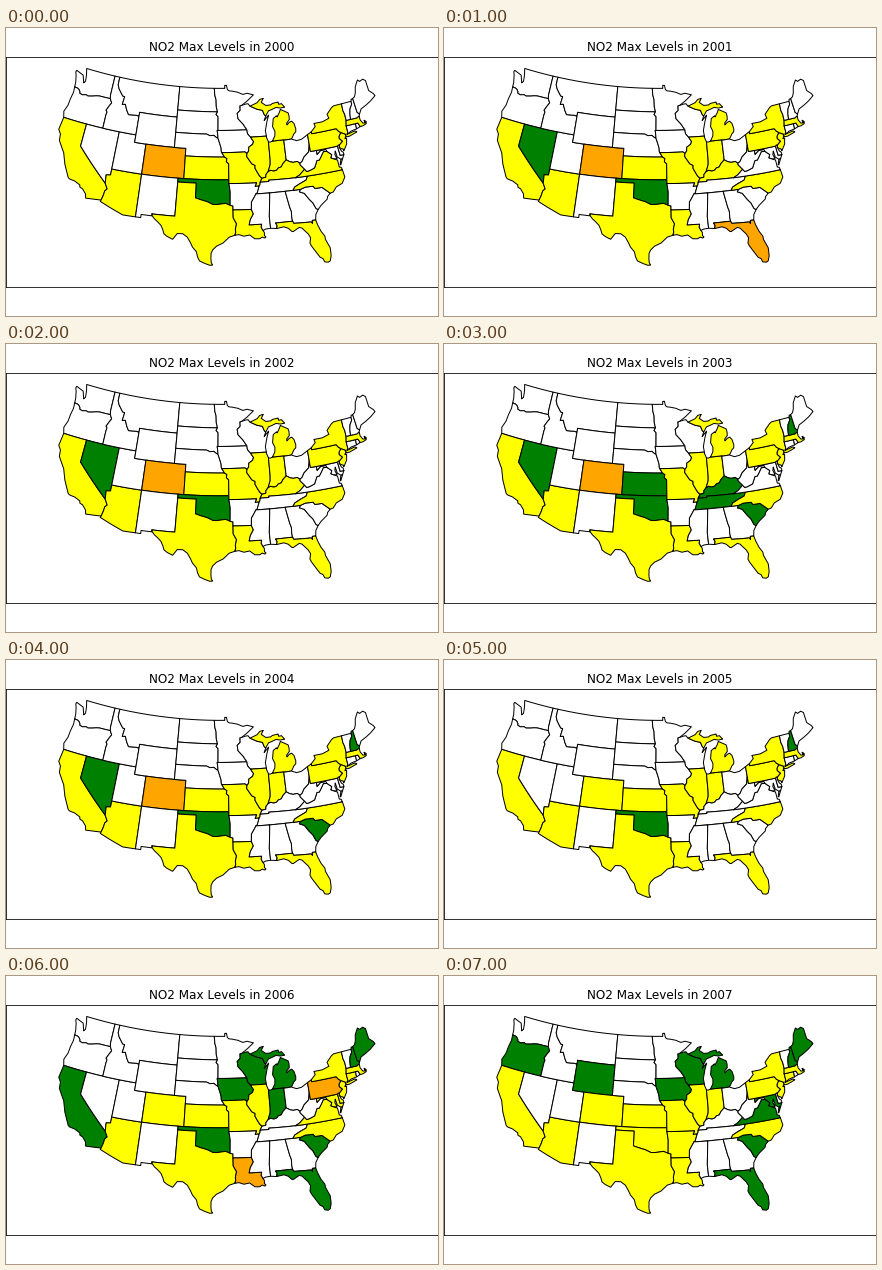
Write a matplotlib script that moves like this. It is 432 by 288 pixels and loops after 8 s.

```python
import numpy as np
import matplotlib.pyplot as plt
from matplotlib.animation import FuncAnimation
from matplotlib.patches import PathPatch
from matplotlib.path import Path

# Lambert conformal conic, standard parallels 33N and 45N, centred on 96W
LAT1, LAT2 = np.radians([33, 45])


def half_tan(lat):
    return np.tan(np.pi / 4 + lat / 2)


CONE = np.log(np.cos(LAT1) / np.cos(LAT2)) / np.log(half_tan(LAT2) / half_tan(LAT1))
SCALE = np.cos(LAT1) * half_tan(LAT1) ** CONE / CONE


def project(west, north):
    rho = SCALE / half_tan(np.radians(north)) ** CONE
    theta = CONE * np.radians(96 - west)
    return np.column_stack([rho * np.sin(theta), -rho * np.cos(theta)])


def line(*v):
    """Pairs of degrees west, degrees north."""
    return list(zip(v[::2], v[1::2]))


def ring(points, steps=6):
    """Closed projected path; long parallels bend, so each edge is subdivided."""
    p = np.array(points + points[:1], float)
    t = np.arange(steps)[:, None] / steps
    fine = np.vstack([a + (b - a) * t for a, b in zip(p, p[1:])] + [p[-1:]])
    codes = [Path.MOVETO] + [Path.LINETO] * (len(fine) - 2) + [Path.CLOSEPOLY]
    return Path(project(*fine.T), codes)


states = {}


def state(code, *rings):
    states[code] = Path.make_compound_path(*map(ring, rings))


# Shared borders, west
columbia = line(124.0, 46.25, 123.4, 46.2, 123.1, 46.1, 122.8, 45.85, 122.75, 45.65,
                122.2, 45.55, 121.5, 45.7, 121.1, 45.6, 120.3, 45.75, 119.6, 45.92,
                119.0, 46, 116.92, 46)
snake = line(116.92, 46, 116.5, 45.5, 116.85, 45, 117.2, 44.4, 116.95, 44.2,
             117.03, 43.8, 117.03, 42)
bitterroot = line(116.05, 48, 115.7, 47.5, 114.75, 46.7, 114.35, 46.65, 114.5, 45.6,
                  113.95, 45.7, 113.45, 44.95, 113.0, 44.45, 111.5, 44.55, 111.05, 44.47)
colorado = line(114.63, 35, 114.13, 34.3, 114.45, 34, 114.53, 33.4, 114.72, 32.72)
mead = line(114.75, 36.1, 114.05, 36.2, 114.05, 37)

# Shared borders, plains
red_north = line(97.23, 49, 97.1, 48.1, 96.85, 47.5, 96.8, 46.6, 96.56, 45.94)
sd_mn = line(96.56, 45.94, 96.83, 45.6, 96.45, 45.3, 96.45, 43.5)
sioux = line(96.45, 43.5, 96.6, 43.5, 96.5, 43, 96.45, 42.49)
niobrara = line(104.05, 43, 98.5, 43, 97.9, 42.8, 97.2, 42.85, 96.7, 42.55, 96.45, 42.49)
ne_ia = line(96.45, 42.49, 96.1, 41.7, 95.9, 41.2, 95.85, 40.7, 95.77, 40.58)
ne_mo = line(95.77, 40.58, 95.3, 40)
ks_mo = line(95.3, 40, 94.9, 39.8, 95.0, 39.4, 94.61, 39.1, 94.62, 37)
red_south = line(94.48, 33.64, 95.2, 33.9, 96.5, 33.75, 97.2, 33.75, 98.1, 34.1,
                 99.2, 34.35, 100, 34.56)
sabine = line(94.04, 33.02, 94.04, 32, 93.55, 31.2, 93.75, 30.5, 93.7, 30.1, 93.85, 29.71)

# Shared borders, Mississippi and Great Lakes
st_croix = line(92.01, 46.71, 92.29, 46.66, 92.29, 46.08, 92.87, 45.7, 92.75, 45,
                91.9, 44.3, 91.22, 43.5)
miss_wi = line(91.22, 43.5, 91.15, 43, 90.64, 42.51)
miss_il = line(90.64, 42.51, 90.15, 41.9, 90.35, 41.55, 91.05, 41.2, 91.1, 40.7, 91.42, 40.38)
miss_mo = line(91.42, 40.38, 91.5, 40, 90.7, 39, 90.15, 38.75, 90.2, 38.4, 89.9, 37.9,
               89.5, 37.3, 89.15, 37)
miss_ky = line(89.15, 37, 89.5, 36.5)
miss_boot = line(89.5, 36.5, 89.55, 36.2, 89.7, 36)
bootheel = line(89.7, 36, 90.37, 36, 90.1, 36.45, 94.62, 36.5)
miss_tn = line(89.7, 36, 90.1, 35.1, 90.31, 35)
miss_ms = line(90.31, 35, 90.6, 34.6, 91.1, 33.95, 91.17, 33)
miss_la = line(91.17, 33, 90.9, 32.4, 91.4, 31.7, 91.63, 31, 89.73, 31, 89.83, 30.6,
               89.59, 30.16)
wi_mi = line(87.6, 45.1, 87.85, 45.35, 88.1, 45.9, 89.1, 46.1, 90.4, 46.57)
wabash = line(87.53, 41.71, 87.53, 39.35, 87.6, 38.7, 88.05, 37.8)

# Shared borders, south and Ohio valley
tombigbee = line(88.2, 35, 88.1, 34.9, 88.47, 31.9, 88.42, 30.38)
al_fl = line(87.53, 30.27, 87.4, 30.65, 87.6, 31, 85, 31)
chatta = line(85.6, 35, 85.18, 32.87, 85.0, 32.3, 85.05, 31.5, 85, 31)
ga_fl = line(85, 31, 84.86, 30.7, 82.2, 30.57, 82.05, 30.36, 82.0, 30.75, 81.49, 30.73)
savannah = line(83.11, 35, 83.35, 34.7, 82.6, 34.4, 81.95, 33.5, 81.5, 33, 81.15, 32.2,
                80.86, 32.03)
nc_sc = line(83.11, 35, 82.3, 35.2, 81.04, 35.15, 80.8, 34.82, 79.67, 34.8, 78.55, 33.86)
smoky = line(84.32, 35, 84.0, 35.4, 83.1, 35.75, 82.0, 36.1, 81.68, 36.59)
ky_tn = line(89.5, 36.5, 88.07, 36.5, 88.07, 36.68, 83.68, 36.6)
cumberland = line(83.68, 36.6, 82.9, 36.9, 81.97, 37.54)
big_sandy = line(82.6, 38.4, 82.6, 38.2, 81.97, 37.54)
ohio_il = line(89.15, 37, 88.5, 37.1, 88.45, 37.45, 88.05, 37.8)
ohio_in = line(88.05, 37.8, 87.6, 37.95, 87.1, 37.8, 86.6, 37.9, 86.3, 38.15, 85.8, 38.25,
               85.4, 38.7, 84.82, 39.1)
ohio_oh = line(84.82, 39.1, 84.25, 38.8, 83.7, 38.65, 83.0, 38.7, 82.6, 38.4)
ohio_wv = line(82.6, 38.4, 82.2, 38.6, 81.75, 39.15, 80.85, 39.7, 80.6, 40.4, 80.52, 40.64)

# Shared borders, Atlantic side
va_wv = line(81.97, 37.54, 81.68, 37.2, 81.2, 37.25, 80.3, 37.5, 79.7, 38.4, 79.3, 38.4,
             78.9, 38.8, 78.35, 39.4, 77.72, 39.32)
md_wv = line(79.48, 39.72, 79.48, 39.2, 78.8, 39.6, 78.4, 39.62, 77.85, 39.6, 77.72, 39.32)
potomac = line(77.72, 39.32, 77.45, 39.1, 77.04, 38.8, 77.3, 38.4, 76.99, 38.24)
de_md = line(75.79, 39.72, 75.7, 38.46, 75.05, 38.45)
delaware_n = line(75.35, 42, 75.05, 41.6, 74.69, 41.36)
delaware_s = line(74.69, 41.36, 75.12, 40.95, 75.2, 40.65, 74.75, 40.2, 75.42, 39.8)
ny_ct = line(73.71, 40.93, 73.5, 41.2, 73.5, 42.05)
champlain = line(73.27, 42.75, 73.25, 43.55, 73.4, 44.1, 73.35, 45.01)
connecticut = line(71.5, 45.01, 71.55, 44.6, 72.05, 44.1, 72.3, 43.5, 72.46, 42.73)
me_nh = line(70.65, 43.09, 70.98, 43.4, 71.08, 45.3)

# West
state("WA", line(122.84, 49, 122.5, 48.18, 122.34, 47.36, 122.59, 47.1, 123.12, 48.04,
                 124.57, 48.38, 124.69, 48.18, 124.4, 47.72, 124.08, 46.86)
      + columbia + line(117.04, 46.43, 117.03, 49))
state("OR", columbia[::-1] + line(123.9, 45.52, 124.08, 44.62, 124.14, 43.71,
                                  124.53, 42.77, 124.21, 42) + snake[::-1])
state("CA", line(120, 42, 124.21, 42, 124.4, 40.31, 123.87, 39.77, 123.73, 38.95,
                 122.95, 38.11, 122.42, 37.55, 121.71, 36.16, 120.62, 34.61, 120.37, 34.45,
                 119.44, 34.35, 118.52, 34.03, 118.41, 33.74, 117.94, 33.62, 117.3, 33.05,
                 117.13, 32.53) + colorado[::-1] + line(120, 39))
state("NV", line(120, 42, 120, 39, 114.63, 35) + mead + line(114.04, 42))
state("AZ", line(109.05, 37) + mead[::-1] + colorado
      + line(114.81, 32.53, 113.3, 32.04, 111.02, 31.33, 109.05, 31.34))
state("UT", line(114.04, 42, 111.05, 42, 111.05, 41, 109.05, 41, 109.05, 37, 114.05, 37))
state("ID", snake[::-1] + line(117.04, 46.43, 117.03, 49, 116.05, 49) + bitterroot
      + line(111.05, 42))
state("MT", line(116.05, 49) + bitterroot + line(111.05, 45, 104.05, 45, 104.05, 49))
state("WY", line(111.05, 41, 111.05, 45, 104.05, 45, 104.05, 41))
state("CO", line(109.05, 37, 109.05, 41, 102.05, 41, 102.05, 37))
state("NM", line(109.05, 37, 103, 37, 103.05, 32, 106.62, 32, 106.51, 31.75,
                 108.24, 31.75, 108.24, 31.34, 109.05, 31.34))

# Plains
state("ND", line(104.05, 45.94, 104.05, 49) + red_north)
state("SD", line(104.05, 45.94) + sd_mn + sioux + niobrara[::-1])
state("NE", niobrara + ne_ia + ne_mo + line(102.05, 40, 102.05, 41, 104.05, 41))
state("KS", line(102.05, 37, 102.05, 40) + ks_mo)
state("OK", line(103, 37, 94.62, 37, 94.62, 36.5, 94.43, 35.4) + red_south
      + line(100, 36.5, 103, 36.5))
state("TX", line(103, 36.5, 100, 36.5) + red_south[::-1] + line(94.04, 33.55) + sabine
      + line(94.69, 29.48, 95.6, 28.74, 96.59, 28.31, 97.14, 27.83, 97.37, 27.38,
             97.38, 26.69, 97.33, 26.21, 97.14, 25.87, 97.53, 25.84, 98.24, 26.06,
             99.02, 26.37, 99.3, 26.84, 99.52, 27.54, 100.11, 28.11, 100.46, 28.7,
             100.96, 29.38, 101.66, 29.78, 102.48, 29.76, 103.11, 28.97, 103.94, 29.27,
             104.46, 29.57, 104.71, 30.12, 105.04, 30.64, 105.63, 31.08, 106.14, 31.4,
             106.51, 31.75, 106.62, 32, 103.05, 32))
state("MN", red_north + sd_mn + st_croix[::-1]
      + line(90.9, 47.25, 89.6, 48.01, 90.83, 48.27, 91.64, 48.14, 92.61, 48.45,
             93.63, 48.61, 94.33, 48.67, 94.64, 48.84, 94.82, 49.39, 95.16, 49.38, 95.16, 49))
state("IA", miss_wi + miss_il + line(91.75, 40.6) + ne_ia[::-1] + sioux[::-1])
state("MO", line(95.77, 40.58, 91.75, 40.6) + miss_mo + miss_ky + miss_boot + bootheel
      + ks_mo[::-1])
state("AR", bootheel[::-1] + miss_tn + miss_ms
      + line(94.04, 33.02, 94.04, 33.55, 94.48, 33.64, 94.43, 35.4))
state("LA", miss_la + line(89.41, 29.89, 89.43, 29.49, 89.22, 29.29, 89.41, 29.16,
                           89.78, 29.31, 90.15, 29.12, 90.88, 29.15, 91.63, 29.68,
                           92.5, 29.55, 93.23, 29.78) + sabine[::-1])

# Great Lakes
state("WI", st_croix + miss_wi + line(87.8, 42.49, 87.9, 43.2, 87.5, 44.3, 87.05, 45.2,
                                      87.95, 44.55) + wi_mi
      + line(90.75, 46.9, 91.2, 46.87))
state("IL", miss_il + miss_mo + ohio_il + wabash[::-1] + line(87.8, 42.3, 87.8, 42.49))
state("IN", ohio_in + line(84.81, 41.76, 86.82, 41.76, 87.2, 41.65) + wabash)
state("MI",
      wi_mi + line(89.0, 46.95, 88.45, 47.35, 87.75, 47.45, 88.2, 46.95, 87.4, 46.5,
                   86.5, 46.5, 86.1, 46.67, 85.0, 46.77, 84.95, 46.47, 84.4, 46.5,
                   83.9, 46, 84.7, 45.95, 85.5, 46.1, 86.3, 45.9, 87.0, 45.75),
      line(86.82, 41.76, 86.3, 42.4, 86.2, 43, 86.53, 43.65, 86.25, 44.7, 85.6, 45,
           85.5, 44.85, 85.0, 45.4, 84.75, 45.77, 84.1, 45.5, 83.4, 45.2, 83.3, 44.8,
           83.35, 44.3, 83.9, 43.9, 83.9, 43.65, 83.4, 43.95, 82.95, 44.05, 82.6, 43.7,
           82.42, 43, 82.5, 42.6, 82.9, 42.35, 83.15, 42.05, 83.45, 41.73, 84.81, 41.7,
           84.81, 41.76))
state("OH", ohio_oh + ohio_wv + line(80.52, 41.98, 81.7, 41.5, 82.6, 41.42,
                                     83.45, 41.73, 84.81, 41.7))

# South
state("KY", miss_ky[::-1] + ohio_il + ohio_in + ohio_oh + big_sandy + cumberland[::-1]
      + ky_tn[::-1])
state("TN", ky_tn + smoky[::-1] + miss_tn[::-1] + miss_boot[::-1])
state("MS", miss_ms + miss_la + line(89.18, 30.32) + tombigbee[::-1])
state("AL", tombigbee + al_fl + chatta[::-1])
state("GA", chatta + ga_fl + line(81.34, 31.44) + savannah[::-1])
state("FL", al_fl + ga_fl
      + line(81.31, 30.04, 80.98, 29.18, 80.54, 28.47, 80.53, 28.04, 80.06, 26.88,
             80.09, 26.21, 80.13, 25.82, 80.38, 25.21, 80.68, 25.08, 81.17, 25.2,
             81.33, 25.64, 81.71, 25.87, 82.24, 26.73, 82.71, 27.5, 82.86, 27.89,
             82.65, 28.55, 82.93, 29.1, 83.71, 29.94, 84.1, 30.09, 85.11, 29.64,
             85.29, 29.69, 85.77, 30.15, 86.4, 30.4))
state("SC", savannah + line(80.3, 32.51, 79.2, 33.16, 79.06, 33.49) + nc_sc[::-1])
state("NC", nc_sc + line(78.05, 33.93, 77.4, 34.51, 76.36, 34.81, 75.73, 35.55,
                         75.87, 36.55) + smoky[::-1])
state("VA", cumberland + va_wv + potomac
      + line(76.3, 37.92, 76.26, 36.97, 75.97, 36.9, 75.87, 36.55, 81.68, 36.59),
      line(75.38, 38.02, 75.94, 37.22, 76.03, 37.26, 75.72, 37.94))
state("WV", va_wv + md_wv[::-1] + line(80.52, 39.72) + ohio_wv[::-1] + big_sandy)

# Northeast
state("MD", md_wv + potomac + line(76.33, 38.08, 76.54, 38.72, 76.35, 39.15, 76.23, 38.32,
                                   75.72, 37.94, 75.38, 38.02) + de_md[::-1])
state("DE", de_md + line(75.07, 38.78, 75.32, 38.96, 75.53, 39.5, 75.42, 39.8, 75.6, 39.84))
state("PA", line(80.52, 39.72, 80.52, 41.98, 79.76, 42.27, 79.76, 42) + delaware_n
      + delaware_s + line(75.6, 39.84, 75.79, 39.72))
state("NJ", delaware_s + line(75.53, 39.5, 75.2, 39.25, 74.98, 39.2, 74.91, 38.94,
                              74.18, 39.71, 73.96, 40.43, 74.26, 40.47, 74.03, 40.7,
                              73.95, 41))
state("NY", line(79.76, 42.27, 79.76, 42) + delaware_n
      + line(73.95, 41, 73.95, 40.75, 73.98, 40.63, 73.35, 40.63, 71.95, 40.93,
             72.24, 41.12) + ny_ct + champlain
      + line(74.87, 45, 75.32, 44.82, 76.38, 44.1, 76.2, 43.55, 77.5, 43.27,
             79.05, 43.27, 78.9, 42.85))
state("CT", ny_ct + line(71.8, 42.02, 71.86, 41.32, 72.88, 41.22))
state("RI", line(71.8, 42.02, 71.38, 42.02, 71.12, 41.49, 71.86, 41.32))
state("MA", line(73.5, 42.05, 73.27, 42.75, 72.46, 42.73, 71.3, 42.7, 70.81, 42.87,
                 70.83, 42.34, 70.5, 41.81, 70.08, 41.78, 70.19, 42.15, 69.88, 41.92,
                 69.97, 41.64, 70.64, 41.48, 71.12, 41.49, 71.38, 42.02, 71.8, 42.02))
state("VT", champlain + connecticut)
state("NH", connecticut + line(71.3, 42.7, 70.81, 42.87) + me_nh + line(71.41, 45.25))
state("ME", me_nh + line(70.66, 45.46, 70.31, 45.92, 70.0, 46.69, 69.24, 47.45,
                         68.91, 47.19, 68.23, 47.35, 67.79, 47.07, 67.79, 45.7,
                         67.14, 45.14, 66.96, 44.81, 68.03, 44.33, 69.06, 43.98,
                         70.12, 43.68))

# Usually yellow; each year then lists its orange, green and extra yellow states
USUAL = "CA AZ CO KS TX OK MO LA IL IN MI PA NY NJ MA NC FL"
YEARS = [
    ("CO", "OK", "KY VA"),
    ("CO FL", "NV OK", "KY"),
    ("CO", "NV OK", "KY"),
    ("CO", "NV KS OK KY TN SC NH", ""),
    ("CO", "NV OK NH SC", ""),
    ("", "OK NH", ""),
    ("LA PA", "CA OK IA WI MI IN SC FL NH ME", "VA MD CT DE"),
    ("", "OR WY IA WI MI ME NH VA MD SC FL", "AR CT"),
]

fig = plt.figure(figsize=(6, 4), dpi=72, facecolor="white")
ax = fig.add_axes([0, 0.1, 1, 0.8])
ax.set(xlim=(-0.4906, 0.4975), ylim=(-1.5062, -0.9792), xticks=[], yticks=[])
title = ax.set_title("", fontsize=12, fontfamily="DejaVu Sans")

patches = {code: ax.add_patch(PathPatch(path, ec="black", lw=1, joinstyle="round"))
           for code, path in states.items()}


def update(i):
    colors = dict.fromkeys(USUAL.split(), "yellow")
    for color, codes in zip(("orange", "green", "yellow"), YEARS[i]):
        colors.update(dict.fromkeys(codes.split(), color))
    for code, patch in patches.items():
        patch.set_facecolor(colors.get(code, "white"))
    title.set_text(f"NO2 Max Levels in {2000 + i}")
    return [title, *patches.values()]


anim = FuncAnimation(fig, update, frames=len(YEARS), interval=1000, repeat=True,
                     repeat_delay=0, blit=False)
plt.show()
```
